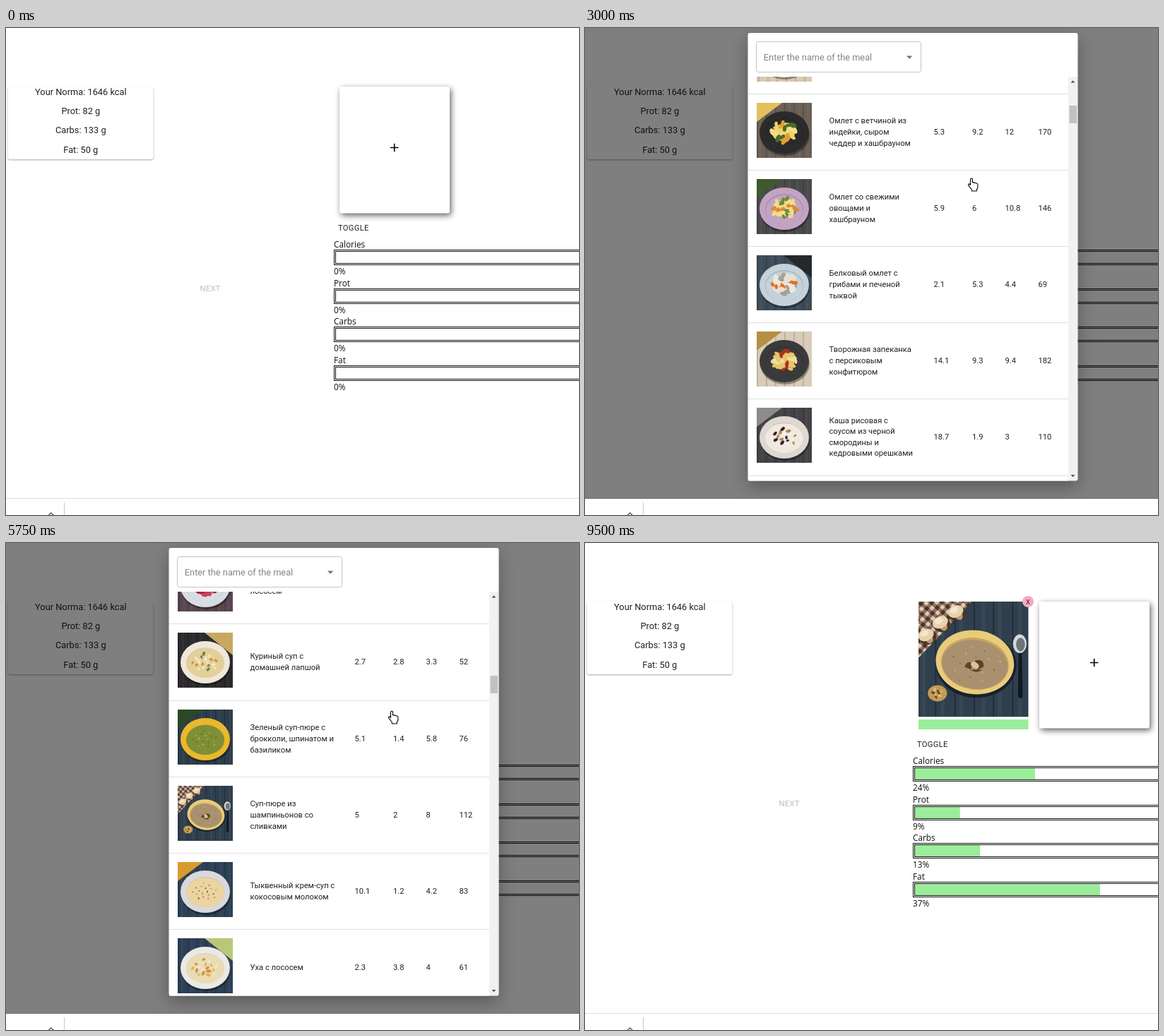
Recreate the animation shown at these times as an HTML page. Size 811 by 690 pixels, loop 9750 ms.

```html
<!DOCTYPE html>
<html lang="en">
<head>
<meta charset="utf-8">
<title>Meal planner</title>
<style>
  html, body { margin: 0; width: 100%; height: 100%; overflow: hidden; background: #fff; }
  svg { display: block; }
  text { font: 11.2px Roboto, sans-serif; fill: #212121; }
  .body { font-size: 12.8px; }
  .mid { text-anchor: middle; }
  .button { letter-spacing: .02857em; }
  .label { font: 11.8px "Open Sans", sans-serif; fill: #111; }
  .crisp { shape-rendering: crispEdges; }
  .paper { fill: #fff; filter: drop-shadow(0 1px 1px rgba(0, 0, 0, .35)); }
  .card { fill: #fff; filter: drop-shadow(2px 3.5px 4.5px rgba(34, 25, 25, .7)); }
  .dialog { fill: #fff; filter: drop-shadow(0 8px 12px rgba(0, 0, 0, .3)); }
</style>
</head>
<body>
<svg id="stage" width="811" height="690" viewBox="0 0 811 690"></svg>
<script>
// name | carbs prot fat calories | table, cloth, side, plate, soup, bit size, bits...
const MEALS = `Сырники с/бельгийским/шоколадом|23.6 10.1 11 234|#3f332f check R #e6e2d8 - 7 #c48a3e #e0b060
Сырники с клюквой|24.7 10.6 11.9 249|#3a2f2c check L #dfe4ea - 7 #d49d48 #e6c072
Блинчики с мясом|3 11.4 11.2 159|#4d3a30 #66724e L #efece6 - 6 #d8a860 #c28a3e
Кукурузные блинчики/с печенью индейки|12.3 6.3 9.2 157|#565a5a #e09a28 L #dbe0e6 - 8 #c58f35 #b07a25
Блинчики с/яблокамcarbohydratesи/и корицей|19.8 3.3 8.8 175|#dcd5ca #93a453 L #7fb4d0 - 7 #e3bf6c #efe0a8
Блинчики с/творогом||#d8c8b0 #eee4d0 L #ece2cc - 7 #d9a050 #e6bd70
Омлет с ветчиной из/индейки, сыром/чеддер и хашбрауном|5.3 9.2 12 170|#6a6056 #e3c15f L #2b2b2b - 7 #f0d668 #f3df8a #4a6b2d #e0a030
Омлет со свежими/овощами и/хашбрауном|5.9 6 10.8 146|#4a4a4c #3f5a2e L #c3a3c4 - 6 #f0dc8a #d98a3a #f0dc8a #6a8a3a
Белковый омлет с/грибами и печеной/тыквой|2.1 5.3 4.4 69|#3d4c58 #26282c R #c5d2da - 7 #ece8dc #e2711d #e6e1d4 #a6a198
Творожная запеканка/с персиковым/конфитюром|14.1 9.3 9.4 182|#d8ccb8 #b58f42 L #3a3a3a - 6 #e8c56a #f0dca0 #e8c56a #b03020
Каша рисовая с/соусом из черной/смородины и/кедровыми орешками|18.7 1.9 3 110|#444246 #8d8b8c L #ded8d0 #efe9e0 4 #3a2030 #b08a50 #f4efe8
Каша овсяная/с ягодами||#4c4440 #8d8b8c L #ded8d0 #e9dcc0 4 #a02a3a #403050
Гранола с/йогуртом||#3d4c58 check L #efece6 #f2efe8 4 #b08a50 #8a5a30
Сэндвич с/курицей||#4d3a30 #66724e R #dfe4ea - 7 #d8a860 #6a8a3a
Греческий/салат||#2d2522 #a02a20 L #d8b040 - 5 #e9e4d0 #6d8f3a #b8402f
Салат Нисуаз с тунцом|6.5 7.1 9.6 142|#3a3432 #9c2a20 L #c9a9bd - 5 #e6d9a0 #6d8f3a #b8402f #e9dcb8
Салат Цезарь с/курицей|5.2 13.6 19.5 235|#2f3f4f #a83022 L #eee9dc - 5 #b9b870 #d8d2a0 #8fa050 #e2dab8
Салат Оливье|5.3 6.2 14.6 177|#5a463a check L #ebe6d8 - 4 #d2b878 #c89a58 #a5a560
Салат с языком и/рукколой в ореховом/соусе|3.3 8.9 16.3 195|#d8d4cc #cfcac0 L #b9d3de - 6 #4f8a2e #2f6b22 #b86858 #e0a040
Зеленый микс салат со/слабосоленым/лососем|4.9 5.7 11.6 143|#4a3b3a #5c7a34 L #b8babd - 6 #3a7a3a #2f6a30 #d8806a #4c8a40
Салат с киноа/и овощами||#d8d4cc check R #efece6 - 5 #d2b878 #4f8a2e #b8402f
Винегрет||#4d3a30 check L #dfe4ea - 4 #9a2040 #c06050 #d2b878
Салат со свеклой и/лососем||#5a4650 #6a4038 L #d8dde4 - 7 #b02035 #c8405a
Куриный суп с/домашней лапшой|2.7 2.8 3.3 52|#2c2a2c #c8a860 R #efe8da #e3cf9a 4 #f1e6c4 #d98840 #f1e6c4 #6a8a40
Зеленый суп-пюре с/брокколи, шпинатом и/базиликом|5.1 1.4 5.8 76|#2d3d4a #2b4826 L #eab82c #7f8f35 2 #a9ac58 #64782c
Суп-пюре из/шампиньонов со/сливками|5 2 8 112|mushroom
Тыквенный крем-суп с/кокосовым молоком|10.1 1.2 4.2 83|#2d4156 #d89a30 L #d9d9dc #ecd4a0 2 #8a6a40 #c09a60
Уха с лососем|2.3 3.8 4 61|#2d4056 #b8c878 R #ebe9e4 #e9dcb4 4 #e08a40 #f0e6c8 #cdbb60
Суп Том Ям|2 3 2 39|#b0aaa4 #d6d2cc L #2e2c2e #e08a38 4 #f0c8a0 #d0602a #eaa860
Борщ с говядиной||#c8c0b8 #dedad4 L #e8e4e0 #b01818 3 #c83028 #8a1014`.split('\n').map(s => s.split('|'));

const PITCH = 108.125, LIST_TOP = 113, LOOP = 9750, STEP = 250;
const COLUMNS = [493.5, 548, 594.5, 641.5];
const BARS = { Calories: 24, Prot: 9, Carbs: 13, Fat: 37 };
const SCROLL = [[2250, 0], [3000, 668.8], [4500, 1633.4], [5000, 1633.4], [5750, 2485.4], [6000, 2644.8]];
const OVERLAY = [[1000, 0], [1500, 1], [7250, 1], [7750, 0]];
const POINTER = [[250, 795, 300], [750, 620, 230], [1000, 549, 180], [2000, 546, 206], [3000, 547, 213],
  [4750, 547, 219], [5750, 546, 238], [6250, 539, 262], [6500, 526, 276], [6750, 500, 262],
  [7000, 482.5, 231], [8750, 482.5, 231], [9000, 560, 290], [9250, 760, 345]];

let seed = 1;
const random = () => (seed = seed * 16807 % 2147483647) / 2147483647;

const text = (x, y, s, cls = '', extra = '') => `<text x="${x}" y="${y}" class="${cls}" ${extra}>${s}</text>`;
const rect = (x, y, w, h, fill, extra = '') => `<rect x="${x}" y="${y}" width="${w}" height="${h}" fill="${fill}" ${extra}/>`;
const oval = (x, y, rx, ry, fill, turn = 0) =>
  `<ellipse cx="${x}" cy="${y}" rx="${rx}" ry="${ry}" fill="${fill}" transform="rotate(${turn} ${x} ${y})"/>`;
const path = (d, fill, extra = '') => `<path d="${d}" fill="${fill}" ${extra}/>`;

// Scatter count ovals inside an ellipse centred on (x, y).
function scatter(count, x, y, rx, ry, size, colors) {
  let out = '';
  for (let i = 0; i < count; i++) {
    const a = i * 2.4, r = Math.sqrt((i + .5) / count), s = size * (.7 + random() * .5);
    out += oval(x + rx * r * Math.cos(a), y + ry * r * Math.sin(a), s, s * .6, colors[i % colors.length], random() * 180);
  }
  return out;
}

function table(color) {
  let out = rect(0, 0, 78, 78, color);
  for (let x = random() * 6; x < 78; x += 13)
    out += rect(x, 0, .7, 78, 'rgba(0,0,0,.35)') + rect(x + 3 + random() * 4, 0, 2.5, 78, 'rgba(255,255,255,.04)');
  return out;
}

function mushroomSoup() {
  let out = table('#2f3f4d') + path('M0 0H38L0 40Z', 'url(#check)');
  for (const [x, y] of [[7, 22.5], [16.6, 14], [27, 6.7]])
    out += oval(x + 1, y + 1.5, 6, 5, '#4a3428') + oval(x + 2, y + 2.5, 2.6, 3.4, '#b99c72', -30)
      + oval(x, y, 5.4, 4, '#e6d3ae', -25) + oval(x - 1, y - 1, 3, 2, '#f2e6cb', -25);
  out += oval(41, 43, 27, 22, '#17202a') + oval(40, 41, 26.5, 21.6, '#e9cb7c', 8) + oval(40, 42, 23, 17.5, '#c9a45a', 8)
    + oval(40, 42.5, 22.3, 16.5, '#a99170', 8) + scatter(16, 40, 43, 19, 13, .9, ['#8d7350', '#bfa885'])
    + path('M33 44q2-5 6-2l-2 4zM40 40q6-2 6 4l-4 2zM37 46q4 3 8 0', '#5d4228')
    + oval(40, 43, 3, 2, '#d9c39a', 30)
    + oval(14.7, 62, 6.5, 5.5, '#c39a55') + scatter(8, 14.7, 62, 4, 3, 1.2, ['#5e421f', '#e0bd78']);
  return out + path('M69.5 30h2l.8 34q-1.6 3-3.2 0z', '#11181f') + oval(70.3, 28.5, 4.6, 6.3, '#d6d9db') + oval(70.8, 29, 3, 4.6, '#6d757b');
}

function dish(spec) {
  const [wood, cloth, side, plate, soup, size, ...bits] = spec.split(' ');
  const isSoup = soup !== '-';
  let out = table(wood);
  out += path(side === 'L' ? 'M0 0H36L0 27Z' : 'M78 0H38L78 32Z', cloth === 'check' ? 'url(#check)' : cloth);
  out += oval(40, 46, 35, 29, 'rgba(0,0,0,.35)') + oval(39, 42, 35, 30, plate)
    + oval(39, 43, 27, 22, 'rgba(0,0,0,.12)') + oval(39, 44, 26, 21, plate);
  out += isSoup ? oval(39, 43, 27, 21, soup) : oval(40, 43, 17, 12, 'rgba(0,0,0,.25)') + oval(39, 41, 17, 12, bits[0], -20);
  return out + (isSoup ? scatter(18, 39, 42, 18, 13, size * .8, bits) : scatter(Math.round(150 / size), 39, 41, 18, 14, size * .75, bits));
}

const photo = (spec, x, y, w, h) => `<svg x="${x}" y="${y}" width="${w}" height="${h}" viewBox="0 0 78 78"
  preserveAspectRatio="xMidYMid slice">${spec === 'mushroom' ? mushroomSoup() : dish(spec)}</svg>`;

function mealRow([name, facts, spec], i) {
  seed = 4001 + i * 997;
  const lines = name.split('/');
  const values = facts ? facts.split(' ') : [18, 12, 14, 200].map(n => (1 + random() * n).toFixed(n < 99 ? 1 : 0));
  return `<g class="row">${rect(231, 0, 453, 109, '#fff')}${rect(231, 0, 453, 1, '#e0e0e0')}`
    + photo(spec, 243, 13, 78, 78)
    + lines.map((s, k) => text(345.5, 58 + (k - (lines.length - 1) / 2) * 15.6, s)).join('')
    + values.map((v, k) => text(COLUMNS[k], 58, v)).join('') + '</g>';
}

const addCard = x => rect(x, 83, 156, 179.5, '#fff', 'rx="3" class="card"')
  + path(`M${x + 72} 169.5h11.4M${x + 77.7} 163.8v11.4`, 'none', 'stroke="#000" stroke-width="1.6"');

function page(added) {
  let out = rect(3, 83, 205.5, 103, '#fff', 'rx="3" class="paper"');
  ['Your Norma: 1646 kcal', 'Prot: 82 g', 'Carbs: 133 g', 'Fat: 50 g']
    .forEach((s, i) => out += text(105.8, 95 + 27.2 * i, s, 'body mid'));
  out += text(274.5, 373, 'NEXT', 'button', 'style="fill:#bdbdbd"');
  if (added) out += photo('mushroom', 472, 83, 155.5, 163.5) + rect(472, 250, 155.5, 14, '#9bed9b')
    + oval(627, 83, 8, 8, '#f5a9c2') + text(627, 86.5, 'X', 'label mid', 'style="font-size:9.5px"');
  out += addCard(added ? 643 : 472) + `<g transform="translate(0 ${added ? 2 : 0})">` + text(470, 287, 'TOGGLE', 'button');
  Object.entries(BARS).forEach(([name, goal], i) => {
    const y = Math.round(314.4 + 54.4 * i), percent = added ? goal : 0;
    out += text(464, y - 3, name, 'label') + text(464, y + 35, percent + '%', 'label')
      + rect(467, y + 3, percent * 7.08, 16, '#9bed9b')
      + path(`M820 ${y + .5}H464.5v21H820M820 ${y + 2.5}H466.5v17H820`, 'none', 'stroke="#111" class="crisp"');
  });
  return out + '</g>';
}

const stage = document.getElementById('stage');
stage.innerHTML = `<defs>
    <pattern id="check" width="5" height="5" patternUnits="userSpaceOnUse" patternTransform="rotate(40)">
      ${rect(0, 0, 5, 5, '#8f6f5c')}${rect(0, 0, 2.5, 2.5, '#dccfc0')}${rect(2.5, 2.5, 2.5, 2.5, '#4a2f24')}
    </pattern>
    <clipPath id="list"><rect x="230" y="69" width="454" height="572.5"/></clipPath>
  </defs>
  <g id="page"></g>
  ${rect(0, 666, 811, 1, '#dcdcdc')}
  <g id="modal">
    ${rect(0, 0, 811, 667, 'rgba(0,0,0,.5)')}
    ${rect(230.5, 7, 467, 634.5, '#fff', 'rx="3" class="dialog"')}
    ${rect(242.5, 19.5, 233, 43, '#fff', 'rx="3" stroke="#c4c4c4"')}
    ${text(252.8, 45.5, 'Enter the name of the meal', 'body', 'style="fill:#858585"')}
    ${path('M455 39.5h8.4l-4.2 4.2z', '#757575')}
    <g clip-path="url(#list)">
      <g id="head">${text(243, 94, 'Image')}${text(345.5, 94, 'Name')}
        ${['Carbs', 'Prot', 'Fat', 'Calories'].map((s, i) => text(COLUMNS[i], 94, s)).join('')}</g>
      ${MEALS.map(mealRow).join('')}
    </g>
    ${rect(684, 69, 13, 572, '#f1f1f1')}
    ${path('M687.5 77.5h6l-3-3.2z', '#505050', 'id="up"')}${path('M687.5 633h6l-3 3.2z', '#505050')}
    ${rect(685.5, 82, 10.5, 25, '#c1c1c1', 'id="thumb"')}
  </g>
  ${rect(0, 667, 811, 23, '#fff')}${rect(82, 672, 1, 18, '#c8c8c8')}
  ${path('M59.5 691l4.2-4 4.2 4', 'none', 'stroke="#5f6368" stroke-width="1.5"')}
  ${path('M-1.5 1q1.5-2 3 0v5q1.5-1 2.5.5 1.5-.8 2.5.6 2-.4 2.4 1.4v4.5l-1.6 3v2h-7v-2l-4.6-6.2q-.6-2.2 1.3-2l1.5 1.6z',
    '#fff', 'id="pointer" stroke="#000" stroke-width="1.1" stroke-linejoin="round"')}`;

const $ = id => document.getElementById(id);
const rows = [...document.querySelectorAll('.row')];

// Linear interpolation through [time, ...values] keys.
function at(keys, t) {
  const next = keys.findIndex(k => k[0] > t);
  if (next === 0) return keys[0].slice(1);
  if (next < 0) return keys[keys.length - 1].slice(1);
  const a = keys[next - 1], b = keys[next], p = (t - a[0]) / (b[0] - a[0]);
  return a.slice(1).map((v, i) => v + (b[i + 1] - v) * p);
}

let shownTime = -1, shownAdded = null;

function draw(t) {
  const added = t >= 7500;
  if (added !== shownAdded) {
    seed = 4001;
    $('page').innerHTML = page(shownAdded = added);
  }

  const [scroll] = at(SCROLL, t), [opacity] = at(OVERLAY, t), [x, y] = at(POINTER, t);
  const still = scroll === at(SCROLL, t - STEP)[0];
  const hovered = still ? Math.floor((y - LIST_TOP + scroll) / PITCH) : -1;

  $('modal').setAttribute('opacity', opacity);
  $('head').setAttribute('transform', `translate(0 ${-Math.round(scroll)})`);
  rows.forEach((row, i) => {
    row.setAttribute('transform', `translate(0 ${Math.round(LIST_TOP + PITCH * i - scroll)})`);
    row.firstChild.setAttribute('fill', i === hovered ? '#c8c2bb' : '#fff');
  });
  $('thumb').setAttribute('y', Math.floor(82 + scroll / 23.4));
  $('up').setAttribute('fill', scroll ? '#505050' : '#a3a3a3');
  $('pointer').setAttribute('transform', `translate(${x} ${y})`);
  $('pointer').setAttribute('visibility', t >= 250 && t < 9500 ? 'visible' : 'hidden');
}

// The picture advances four times a second.
function tick() {
  const t = Math.floor(performance.now() % LOOP / STEP) * STEP;
  if (t !== shownTime) draw(shownTime = t);
  requestAnimationFrame(tick);
}
tick();
</script>
</body>
</html>
```
